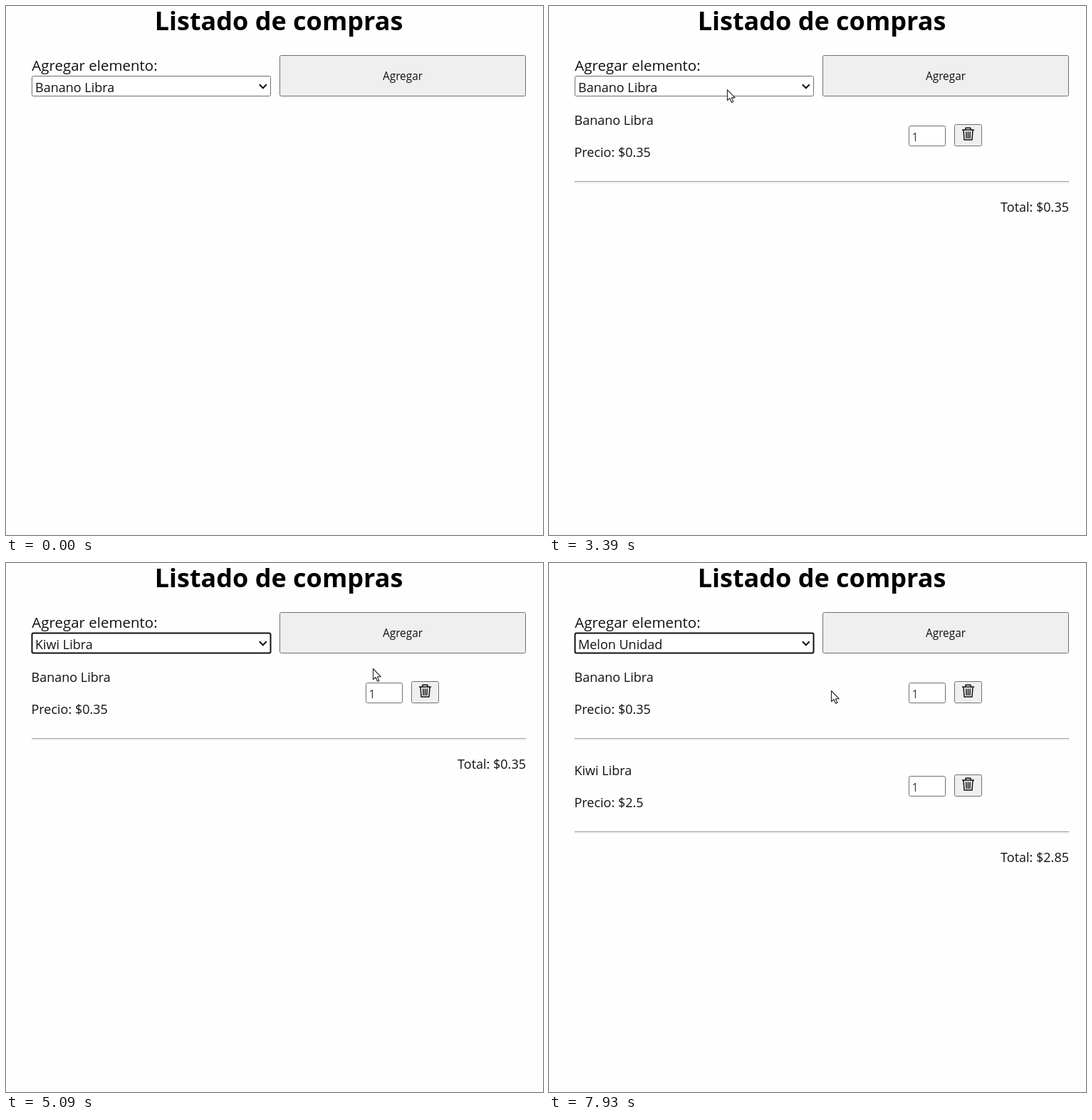
An HTML page for the animation above (8 s loop, 754 px wide and 743 px high).

```html
<!DOCTYPE html>
<html lang="es">
<head>
<meta charset="utf-8">
<title>Listado de compras</title>
<style>
  html, body { margin: 0; width: 100%; height: 100%; overflow: hidden; background: #fefefe; }
  svg { display: block; width: 100%; height: 100%; font: 18px "Open Sans", "Noto Sans", sans-serif; fill: #111; }
  .box { stroke: #707070; }
  .line { fill: none; stroke: #111; }
  .focus { stroke: #101010; stroke-width: 2; }
  .hover { fill: #e3e3e3; stroke: #4a4a4a; }
</style>
</head>
<body>
<svg id="stage" viewBox="0 0 754 743"></svg>
<script>
const LOOP = 8000, STEP = 70, REACT = 120, PRESS = 140;
const ROW = 26.88, LIST_TOP = 128, ITEM_H = 131;
const OPTIONS = ['Banano Libra', 'Cereza Libra', 'Fresa Libra', 'Kiwi Libra', 'Mango Unidad',
  'Manzana Amarrilla Libra', 'Manzana Verde Libra', 'Melon Unidad', 'Sandia Unidad'];
const PRICES = { 'Banano Libra': 0.35, 'Kiwi Libra': 2.5 };

// Pointer moves: start, end, x, y reached
const MOVES = [
  [60, 130, 650, 655], [130, 690, 325, 61], [690, 830, 276, 107],
  [1240, 1520, 189, 132], [1730, 2150, 499, 94], [2410, 2760, 504, 137],
  [2910, 3400, 235, 116], [3660, 3890, 222, 242], [4070, 4210, 221, 228],
  [4750, 5090, 515, 148], [5090, 5300, 533, 104], [5640, 6060, 225, 114],
  [6270, 6610, 215, 298], [6610, 7040, 200, 328], [7650, 7930, 396, 179]
];
const CLICKS = [1030, 1520, 2150, 3450, 4540, 5430, 6060, 7180];

const ease = k => k * k * (3 - 2 * k);
const rowAt = y => Math.min(OPTIONS.length - 1, Math.floor((y - LIST_TOP) / ROW));
const onButton = ([x, y]) => x > 384 && x < 730 && y > 69 && y < 127;

function pointerAt(t) {
  let [, , x, y] = MOVES[0];
  for (const [start, end, toX, toY] of MOVES) {
    if (t < start) break;
    const passed = Math.floor((t - start) / STEP) * STEP;
    const k = t >= end ? 1 : ease(passed / (end - start));
    x += (toX - x) * k;
    y += (toY - y) * k;
  }
  return [x, y];
}

// Each click acts on whatever lies under the pointer
function pageAt(t) {
  const page = { open: false, focus: false, value: 0, items: [] };
  for (const time of CLICKS.filter(c => c + REACT <= t)) {
    const at = pointerAt(time);
    if (page.open) {
      Object.assign(page, { open: false, focus: true, value: rowAt(at[1]) });
    } else if (onButton(at)) {
      page.items.push(OPTIONS[page.value]);
      Object.assign(page, { focus: false, value: 0 });
    } else {
      Object.assign(page, { open: true, focus: false });
    }
  }
  return page;
}

const text = (x, y, s, extra = '') => `<text x="${x}" y="${y}" ${extra}>${s}</text>`;
const box = (x, y, w, h, fill, extra = '') =>
  `<rect class="box" x="${x}" y="${y}" width="${w}" height="${h}" fill="${fill}" ${extra}/>`;

const itemRow = (name, i) => `<g transform="translate(0 ${i * ITEM_H})">
  ${text(35.5, 167, name)}
  ${text(35.5, 212, 'Precio: $' + PRICES[name])}
  ${box(505.5, 168.5, 51, 28, '#fff', 'rx="2"')}
  ${text(509.5, 189.5, '1', 'font-size="16" fill="#443c34"')}
  ${box(569.5, 166.5, 38, 30, '#efefef', 'rx="2"')}
  <path class="line" stroke-width="1.5" stroke-linecap="round" stroke-linejoin="round"
    d="M580.5 174h16M585 174v-2.8h7v2.8M582 174l1 14h11l1-14M585.7 177l.4 8.5M588.5 177v8.5M591.3 177l-.4 8.5"/>
  <path d="M36 246h694v1H36z" fill="#969696"/>
  <path d="M36 247h1v1h693v1H36z" fill="#e9e9e9"/>
</g>`;

const cart = items => {
  if (!items.length) return '';
  const total = items.reduce((sum, name) => sum + PRICES[name], 0).toFixed(2);
  return items.map(itemRow).join('') +
    text(730, 158 + items.length * ITEM_H, 'Total: $' + total, 'text-anchor="end"');
};

const stage = document.getElementById('stage');
stage.innerHTML = `
  <defs><filter id="shadow" x="-5%" y="-5%" width="110%" height="110%">
    <feDropShadow dx="0" dy="2" stdDeviation="2" flood-opacity=".3"/></filter></defs>
  <rect width="754" height="743" fill="#fefefe"/>
  ${text(383, 33.5, 'Listado de compras', 'font-size="36" font-weight="700" text-anchor="middle" fill="#000"')}
  ${text(36.3, 91.3, 'Agregar elemento:', 'font-size="20.5"')}
  ${box(36.5, 98.5, 335, 28, '#fff', 'id="select" rx="2"')}
  ${text(41, 120.5, '', 'id="value"')}
  <path class="line" stroke-width="2" d="M355.8 110.3l5 5 5-5"/>
  ${box(384.5, 69.5, 345, 57, '#efefef', 'id="button" rx="2"')}
  ${text(557, 104.2, 'Agregar', 'font-size="15.4" text-anchor="middle"')}
  <g id="cart"></g>
  <g id="list">
    ${box(37.5, 127.5, 334, 244, '#fff', 'filter="url(#shadow)"')}
    <rect id="mark" x="38" width="333" height="27" fill="#1e90ff"/>
    ${OPTIONS.map((s, i) => text(43, 148.8 + i * ROW, s, 'class="option"')).join('')}
  </g>
  <path id="pointer" fill="#fff" stroke="#222" stroke-width="1.1" stroke-linejoin="round"
    d="M.5.5v15l3.5-3 2.5 5.8 2.4-1-2.5-5.6h4.8z"/>
  <circle id="press" r="14.5" fill="#eeee28" fill-opacity=".6"/>`;

const el = id => document.getElementById(id);
const show = (id, on) => el(id).setAttribute('display', on ? 'inline' : 'none');
const set = (node, attrs) => { for (const k in attrs) node.setAttribute(k, attrs[k]); };
const options = [...document.querySelectorAll('.option')];
let shown = -1;

function draw(t) {
  const page = pageAt(t), at = pointerAt(t), [x, y] = at;
  const active = y >= LIST_TOP ? rowAt(y) : page.value;
  const visible = t >= MOVES[0][1];

  el('value').textContent = OPTIONS[page.value];
  el('select').classList.toggle('focus', page.focus);
  el('button').classList.toggle('hover', visible && onButton(at));
  if (shown !== page.items.length) {
    shown = page.items.length;
    el('cart').innerHTML = cart(page.items);
  }

  show('list', page.open);
  set(el('mark'), { y: Math.round(LIST_TOP + active * ROW) });
  options.forEach((o, i) => set(o, { fill: i === active ? '#fff' : '#111' }));

  show('pointer', visible);
  set(el('pointer'), { transform: `translate(${x} ${y})` });
  show('press', CLICKS.some(c => t >= c && t < c + PRESS));
  set(el('press'), { cx: x - 0.5, cy: y + 0.5 });
}

const start = performance.now();
function tick() {
  draw((performance.now() - start) % LOOP);
  requestAnimationFrame(tick);
}
tick();
</script>
</body>
</html>
```
